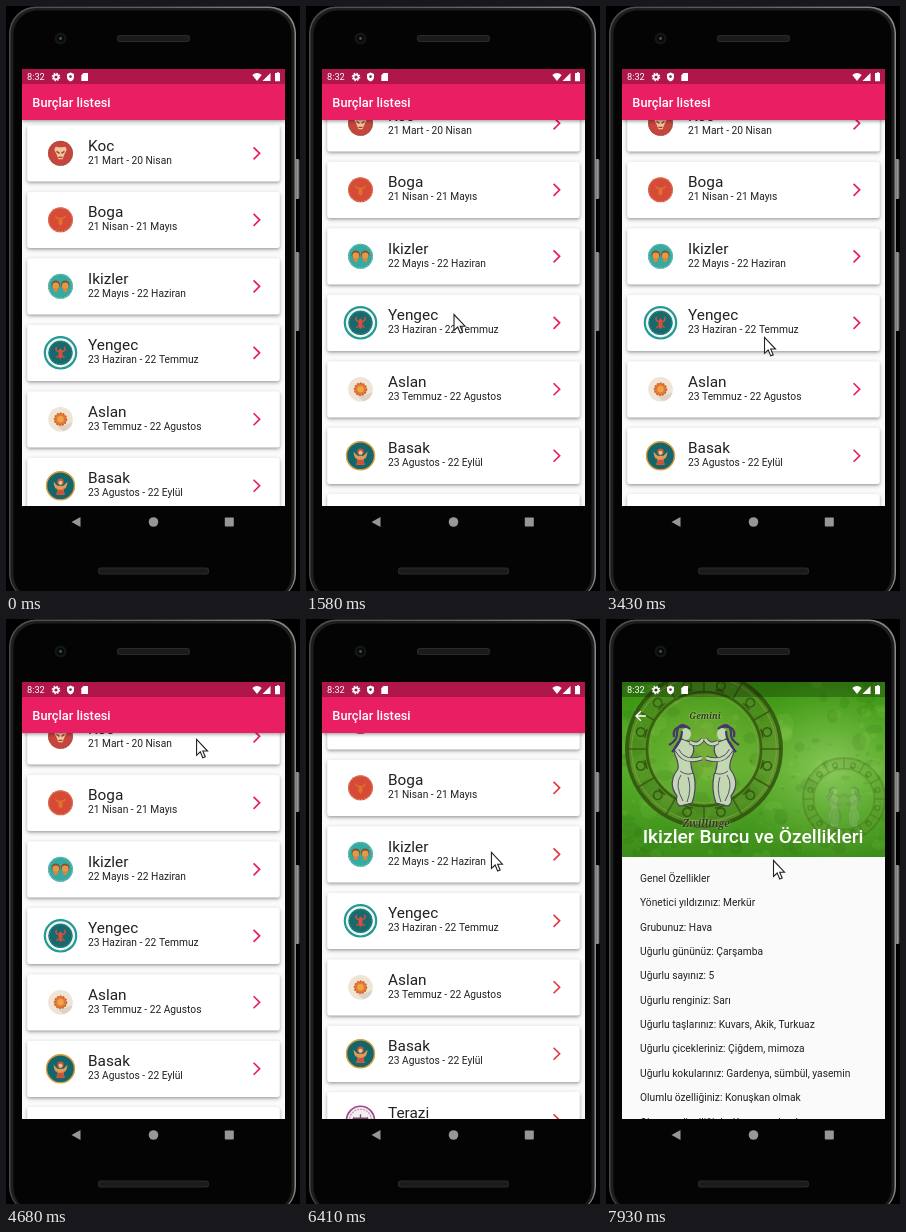
An HTML page with a canvas for the animation above (8 s loop, 294 px wide and 585 px high).

```html
<!DOCTYPE html>
<html lang="tr">
<head>
<meta charset="utf-8">
<title>Burçlar listesi</title>
<style>
html, body { margin: 0; width: 100%; height: 100%; overflow: hidden; background: #000; }
canvas { display: block; width: 294px; height: 585px; }
</style>
</head>
<body>
<canvas id="stage" width="294" height="585"></canvas>
<script>
const c = document.getElementById('stage').getContext('2d');
const LOOP = 8000, PINK = '#e91e63', INK = '#212121';
const DP = 263 / 411.4, ROW = 104 * DP, CARD = 88 * DP;

const rows = [
  ['Koc', '21 Mart - 20 Nisan'], ['Boga', '21 Nisan - 21 Mayıs'],
  ['Ikizler', '22 Mayıs - 22 Haziran'], ['Yengec', '23 Haziran - 22 Temmuz'],
  ['Aslan', '23 Temmuz - 22 Agustos'], ['Basak', '23 Agustos - 22 Eylül'],
  ['Terazi', '23 Eylül - 22 Ekim']
];
const facts = [
  'Genel Özellikler', 'Yönetici yıldızınız: Merkür', 'Grubunuz: Hava',
  'Uğurlu gününüz: Çarşamba', 'Uğurlu sayınız: 5', 'Uğurlu renginiz: Sarı',
  'Uğurlu taşlarınız: Kuvars, Akik, Turkuaz', 'Uğurlu çicekleriniz: Çiğdem, mimoza',
  'Uğurlu kokularınız: Gardenya, sümbül, yasemin', 'Olumlu özelliğiniz: Konuşkan olmak',
  'Olumsuz özelliğiniz: Kararsız olmak'
];
// Pointer waypoints: time, x, y
const pointer = [
  [470, 248, 572], [650, 225, 430], [960, 130, 196], [1230, 147.5, 308], [1900, 147.5, 308],
  [2130, 150, 322], [2300, 150, 322], [2640, 148, 317], [2850, 152, 338], [3010, 151, 320],
  [3120, 151, 320], [3230, 151, 332], [3370, 151, 332], [3430, 158, 331], [4180, 171, 213],
  [4680, 190, 120], [4770, 197, 103], [4960, 210, 230], [5090, 205, 225], [5300, 207, 230],
  [5500, 207, 230], [6050, 213, 264], [6160, 213, 264], [6500, 175, 222], [6970, 133, 235],
  [7110, 132, 236], [7540, 132, 236], [7900, 167, 241]
];

const clamp = v => Math.max(0, Math.min(1, v));
const easeOut = p => 1 - (1 - p) ** 3;

function at(t) {
  const i = pointer.findIndex(k => k[0] > t);
  if (i < 0) return pointer[pointer.length - 1].slice(1);
  const a = pointer[i - 1], b = pointer[i], p = (t - a[0]) / (b[0] - a[0]);
  return [a[1] + (b[1] - a[1]) * p, a[2] + (b[2] - a[2]) * p];
}
function seeded(seed) {
  return () => (seed = seed * 16807 % 2147483647) / 2147483647;
}
function rect(x, y, w, h, fill, r = 0) {
  c.beginPath(); c.roundRect(x, y, w, h, r);
  c.fillStyle = fill; c.fill();
}
function disc(x, y, r, fill, ry = r) {
  c.beginPath(); c.ellipse(x, y, r, ry, 0, 0, 7);
  c.fillStyle = fill; c.fill();
}
function ring(x, y, r, color, width = 1, dash = []) {
  c.setLineDash(dash);
  c.beginPath(); c.arc(x, y, r, 0, 7);
  c.strokeStyle = color; c.lineWidth = width; c.stroke();
  c.setLineDash([]);
}
function path(d, fill, stroke, width = 1) {
  const p = new Path2D(d);
  if (fill) { c.fillStyle = fill; c.fill(p); }
  if (stroke) { c.strokeStyle = stroke; c.lineWidth = width; c.stroke(p); }
}
function text(s, x, y, size, color = INK, weight = 400, family = 'Roboto, sans-serif') {
  c.font = `${weight} ${size}px ${family}`;
  c.fillStyle = color;
  c.fillText(s, x, y);
}
function placed(x, y, draw, scale = 1, flip = 1) {
  c.save(); c.translate(x, y); c.scale(scale * flip, scale); draw(); c.restore();
}
function shadow(color, blur, y) {
  c.shadowColor = color; c.shadowBlur = blur; c.shadowOffsetY = y;
}
function gradient(g, ...colors) {
  colors.forEach((color, i) => g.addColorStop(i / (colors.length - 1), color));
  return g;
}

const badges = [
  () => {
    disc(0, 0, 12.5, '#c9443c'); ring(0, 0, 11.7, '#8a5a50', 1.2, [1.5, 1.5]);
    path('M-6-3Q-6-8-2-6H2Q6-8 6-3L4 1L2 6H-2L-4 1Z', '#edc69c');
    path('M-4-2L-1 0M4-2L1 0M-2 4H2', null, '#a83b33', 1.4);
  },
  () => {
    disc(0, 0, 12.5, '#d64b37'); ring(0, 0, 11.8, '#d99068', 1, [2, 1.2]);
    path('M-5-5Q-6-1-2-1L-2 4L0 6L2 4L2-1Q6-1 5-5Q4-2 0-2Q-4-2-5-5Z', '#e0702f');
  },
  () => {
    disc(0, 0, 12.5, '#35aaa2'); ring(0, 0, 11.8, '#8cc5b5', 1, [2, 1.2]);
    for (const x of [-4.7, 4.7]) {
      disc(x, -1.5, 4.3, '#86502d'); disc(x, -.5, 3.4, '#e39a48'); disc(x, 4, 2.2, '#d9843f', 2);
    }
  },
  () => {
    disc(0, 0, 16.8, '#219a96'); ring(0, 0, 13.4, '#f4f4ee', 2.4); disc(0, 0, 11.8, '#17696d');
    ring(0, 0, 11.2, '#3b9490', 1, [1.5, 1.5]);
    disc(0, 1, 2, '#d84f3a', 5);
    path('M-1-1Q-6-2-4-6M1-1Q6-2 4-6M-2 3L-4 5M2 3L4 5', null, '#d84f3a', 1.4);
  },
  () => {
    disc(0, 0, 12.3, '#efe4d5');
    path('M4 6L12 3A12 12 0 0 1 3 12L-4 6Z', '#ddd2c5');
    disc(0, 0, 6.2, '#e47a32'); ring(0, 0, 6, '#c95a2d', 1.5, [1.5, 1.5]); disc(0, 0, 3.2, '#f0a44a');
  },
  () => {
    disc(0, 0, 14.3, '#14666b'); ring(0, 0, 14, '#dfa03e', 1.4);
    path('M-7-4Q-6 4-3 3L-4 9H4L3 3Q6 4 7-4L3 0H-3Z', '#e59a58');
    disc(0, -4, 3.2, '#c85a3a'); disc(0, -3, 2, '#f0c08b');
    path('M-3 4H3L4 9H-4Z', '#c9543c');
  },
  () => {
    disc(0, 0, 14.5, '#f1edf0'); ring(0, 0, 14, '#a3478d', 1.6); ring(0, 0, 11, '#b99ab5', 1.2, [2, 1]);
    path('M-7-2H7M0-6V7M-7-2L-9 3H-5ZM7-2L5 3H9Z', '#d98953', '#7a4a70', 1.3);
  }
];

function drawList(t) {
  const scroll = t < 5470 ? 30 * easeOut(clamp((t - 1260) / 300)) : 45;
  const chevron = t < 5470 ? PINK : '#e23b48';
  rect(16, 63, 263, 437, '#fafafa');
  rows.forEach(([name, dates], i) => {
    const top = 119.2 + i * ROW - scroll, mid = top + CARD / 2;
    c.save();
    shadow('rgba(0,0,0,.38)', 3.5, 1.6);
    rect(21.2, top, 252.6, CARD, '#fff', 2.5);
    c.restore();
    if (i === 2 && t >= 7290) {
      rect(21.2, top, 252.6, CARD, '#f9f9f9', 2.5);
      disc(130, 236, 6, '#e6e6e6');
    }
    placed(54.5, mid, badges[i]);
    text(name, 82, mid - 2.5, 15.36);
    text(dates, 82, mid + 10.6, 10.24);
    placed(247.6, mid, () => path('M0-6L6 0L0 6', null, chevron, 1.7));
  });
  c.save();
  shadow('rgba(0,0,0,.4)', 3.5, 1.6);
  rect(16, 63, 263, 51, PINK);
  c.restore();
  text('Burçlar listesi', 26.3, 101, 12.8, '#fff', 500);
}

function twin() {
  const skin = '#c3d8b2', line = '#4b4360';
  path('M-22-10Q-32-4-29 6Q-25 14-26 20Q-37 34-27 47Q-29 54-24 57L-12 54Q-7 40-10 26Q-14 18-13 8Q-8 2-12-6Z', skin, line, 1.2);
  path('M-14-7Q-6-2-1-10M-27 1Q-20 15-2 9', null, line, 4.5);
  path('M-14-7Q-6-2-1-10M-27 1Q-20 15-2 9', null, skin, 2.8);
  disc(-18, -15, 5, skin, 6);
  path('M-14-20Q-25-29-27-17Q-26-9-35-4M-18-22Q-32-24-30-12M-22-18Q-22-8-32 3', null, '#47356a', 2.2);
  path('M-24 22Q-17 27-11 24M-23 26Q-30 36-21 52M-16 28Q-12 40-17 53', null, line, .9);
}
function wheel(r, alpha) {
  c.globalAlpha *= alpha;
  ring(0, 0, r * .86, 'rgba(70,105,25,.4)', r * .24);
  ring(0, 0, r, '#31500f', r * .05);
  ring(0, 0, r * .94, '#8b9d45', 1);
  ring(0, 0, r * .74, '#36560f', r * .035);
  ring(0, 0, r * .7, '#8b9d45', .8);
  for (let i = 0; i < 12; i++) {
    c.save();
    c.rotate(i * Math.PI / 6);
    path(`M0 ${-r * .74}V${-r}`, null, '#36560f', 1.5);
    c.rotate(Math.PI / 12);
    c.translate(0, -r * .85);
    ring(0, 0, r * .055, '#31500f', 1.6);
    path(`M${-r * .06} ${r * .07}H${r * .06}`, null, '#31500f', 1.6);
    c.restore();
  }
}

function drawDetail() {
  rect(16, 63, 263, 437, '#fafafa');
  c.save();
  c.beginPath(); c.rect(16, 63, 263, 175); c.clip();
  rect(16, 63, 263, 175, gradient(c.createLinearGradient(0, 63, 0, 238), '#389310', '#55ad28', '#3c8d19'));
  const glow = (x, y, r, color) =>
    rect(16, 63, 263, 175, gradient(c.createRadialGradient(x, y, 0, x, y, r), color, 'rgba(130,190,70,0)'));
  glow(225, 150, 95, 'rgba(165,215,120,.65)');
  glow(98, 130, 85, 'rgba(150,180,70,.6)');
  const rnd = seeded(41);
  for (let i = 0; i < 260; i++) {
    const x = 16 + 263 * rnd(), y = 63 + 175 * rnd(), r = 1 + 9 * rnd() ** 2;
    disc(x, y, r, rnd() < .5 ? 'rgba(25,80,5,.1)' : 'rgba(190,230,120,.09)', r * (.4 + rnd()));
  }
  placed(98, 130, () => wheel(77, .85));
  placed(238, 180, () => wheel(41, .25));
  for (const s of [1, -1]) {
    placed(98, 130, twin, 1, s);
    c.save();
    c.globalAlpha *= .2;
    placed(238, 180, twin, .5, s);
    c.restore();
  }
  c.textAlign = 'center';
  const script = '"Noto Serif", serif';
  c.save();
  shadow('#c8e0a0', 2, 0);
  text('Gemini', 99, 100, 8.5, '#2c3a1c', 'italic 600', script);
  text('Zwillinge', 100, 208, 10, '#2c3a1c', 'italic 600', script);
  c.restore();
  text('Ikizler Burcu ve Özellikleri', 147, 224, 19.2, '#fff', 500);
  c.textAlign = 'left';
  path('M40 97H30M34.8 92.2L30 97L34.8 101.8', null, '#fff', 1.4);
  c.restore();
  facts.forEach((s, i) => text(s, 34, 263 + i * 24.35, 10.24));
}

function drawStatus() {
  rect(16, 63, 263, 15, 'rgba(0,0,0,.25)');
  text('8:32', 21, 74.2, 9.2, '#fff');
  ring(50, 71, 2.4, '#fff', 1.7);
  ring(50, 71, 3.7, '#fff', 1.2, [1.5, 1.4]);
  path('M64.5 66.5L68 68V71Q68 74 64.5 75.6Q61 74 61 71V68Z', '#fff');
  disc(64.5, 70.6, 1.3, '#6b3045');
  path('M77.5 67H82V75H75.3V69.2Z', '#fff');
  path('M246.3 69Q251 65.2 255.7 69L251 75Z', '#fff');
  path('M264.5 67V75H256.5Z', '#fff');
  path('M270 67H271V66.3H273V67H274V75.2H269V67Z', '#fff');
}

function drawPhone() {
  rect(0, 0, 294, 585, '#000');
  for (const [y, h] of [[153, 40], [246, 79]]) {
    rect(289, y, 4.5, h, gradient(c.createLinearGradient(289, 0, 293.5, 0), '#333', '#a0a0a0', '#555'), 1.5);
  }
  const rim = gradient(c.createLinearGradient(3, 0, 291, 0), '#4a4a4a', '#606060', '#8a8a8a');
  rect(3, .5, 287, 594, rim, 27);
  rect(4.5, 2, 284, 592, '#1d1d1d', 26);
  rect(7.5, 4.5, 278, 588, '#040404', 24);
  disc(54.5, 32.5, 6, '#151516'); disc(54.5, 32.5, 3.6, '#07090b'); disc(54.5, 32.5, 1.4, '#3a5c60');
  for (const [x, y, w] of [[111, 29, 73], [92, 561.5, 111]]) {
    rect(x, y, w, 7, '#2a2a2a', 3);
    rect(x + 1, y + 1, w - 2, 5, '#1b1b1b', 2.2);
  }
  path('M74.5 511V521L65.5 516Z', '#979797');
  disc(147.5, 516, 4.8, '#979797');
  rect(218.8, 511.5, 9, 9, '#979797', .7);
}

function draw(t) {
  drawPhone();
  c.save();
  c.beginPath(); c.rect(16, 63, 263, 437); c.clip();
  const p = clamp((t - 7550) / 310);
  if (p < 1) drawList(t);
  if (p > 0) {
    c.save();
    c.globalAlpha = p * p;
    c.translate(0, 109 * (1 - easeOut(p)));
    drawDetail();
    c.restore();
  }
  drawStatus();
  c.restore();
  if (t >= 470) {
    placed(...at(t), () => path('M.5 .5V16.5L4.2 13L6.7 19L9.2 18L6.7 12.2H11.5Z', '#fff', '#222', 1.1));
  }
}

function frame(now) {
  draw(now % LOOP);
  requestAnimationFrame(frame);
}
requestAnimationFrame(frame);
</script>
</body>
</html>
```
